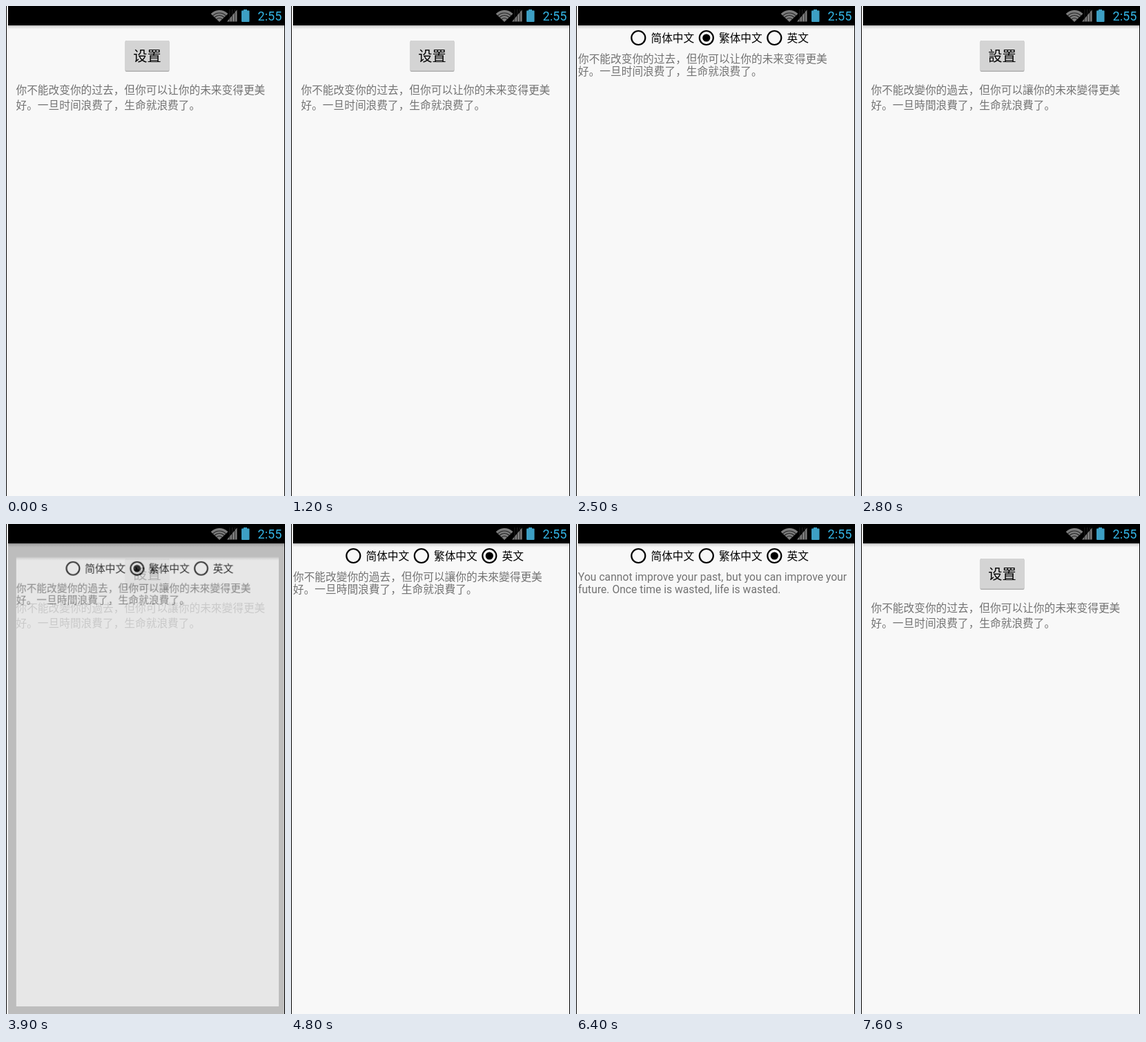
Animation, 404 px wide and 708 px high, one loop 8.6 s. Source, as an HTML page with a canvas:

```html
<!DOCTYPE html>
<html lang="zh">
<head>
<meta charset="utf-8">
<title>Language setting</title>
<style>
html, body { margin: 0; width: 100%; height: 100%; overflow: hidden; background: #000; }
canvas { display: block; width: 404px; height: 708px; }
</style>
</head>
<body>
<canvas id="stage"></canvas>
<script>
const W = 404, H = 708, LOOP = 8600, STEP = 100, ZOOM = 300;
const BAR = 28, LEFT = 3, RIGHT = 403;
const SCREEN_W = 404, SCREEN_H = 718;
const CX = LEFT + SCREEN_W / 2, CY = SCREEN_H / 2;
const CJK = '"Noto Sans CJK SC", "Noto Sans CJK", sans-serif';
const LATIN = 'Roboto, sans-serif';

const langs = [
  { font: CJK, button: '设置', half: 31.5,
    home: ['你不能改变你的过去，但你可以让你的未来变得更美', '好。一旦时间浪费了，生命就浪费了。'] },
  { font: CJK, button: '設置', half: 31.5,
    home: ['你不能改變你的過去，但你可以讓你的未來變得更美', '好。一旦時間浪費了，生命就浪費了。'] },
  { font: LATIN, button: 'setting', half: 39,
    home: ['You cannot improve your past, but you can improve', 'your future. Once time is wasted, life is wasted.'],
    panel: ['You cannot improve your past, but you can improve your', 'future. Once time is wasted, life is wasted.'] }
];
const options = ['简体中文', '繁体中文', '英文'];

// open: settings zoom in; pick: another language is tapped;
// lead: how far the zoom is when it first shows
const visits = [
  { open: 1400, pick: 2500, from: 0, to: 1, lead: 0.2955 },
  { open: 3900, pick: 4800, from: 1, to: 2, lead: 0.219 },
  { open: 6200, pick: 7300, from: 2, to: 0, lead: 0.25 }
];
const presses = [1100, 6000];

const dpr = window.devicePixelRatio || 1;

function setup(canvas, w, h) {
  canvas.width = Math.round(w * dpr);
  canvas.height = Math.round(h * dpr);
  const c = canvas.getContext('2d');
  c.scale(dpr, dpr);
  return c;
}

const layer = document.createElement('canvas');
const stageCtx = setup(document.getElementById('stage'), W, H);
const layerCtx = setup(layer, LEFT + SCREEN_W, SCREEN_H);
let ctx = stageCtx;

function rect(x, y, w, h, fill) {
  ctx.fillStyle = fill;
  ctx.fillRect(x, y, w, h);
}

function round(x, y, w, h, r, fill) {
  ctx.fillStyle = fill;
  ctx.beginPath();
  ctx.roundRect(x, y, w, h, r);
  ctx.fill();
}

function poly(points, fill) {
  ctx.fillStyle = fill;
  ctx.beginPath();
  points.forEach(([x, y]) => ctx.lineTo(x, y));
  ctx.fill();
}

function text(str, x, y, size, font, color, align = 'left') {
  ctx.font = size + 'px ' + font;
  ctx.textAlign = align;
  ctx.fillStyle = color;
  ctx.fillText(str, x, y);
}

function windowBack() {
  rect(LEFT, BAR, SCREEN_W, SCREEN_H - BAR, '#f8f8f8');
  const g = ctx.createLinearGradient(0, BAR, 0, BAR + 6);
  g.addColorStop(0, 'rgba(0,0,0,.24)');
  g.addColorStop(0.5, 'rgba(0,0,0,.07)');
  g.addColorStop(1, 'rgba(0,0,0,0)');
  rect(LEFT, BAR, SCREEN_W, 6, g);
}

function drawButton(lang, pressed) {
  const x = 204.5 - lang.half, w = lang.half * 2;
  if (pressed) {
    round(x - 4.5, 45, w + 9, 54, 4, '#a9daee');
    round(x - 0.5, 49, w + 1, 46, 2, '#4cbbe7');
    rect(x, 94, w, 1, '#3fa5cd');
  } else {
    round(x - 0.5, 50, w + 1, 45, 2, '#b0b0b0');
    round(x, 50, w, 43.5, 1.5, '#d4d4d4');
  }
  text(lang.button, 204.5, 80, 20.2, lang.font, '#000', 'center');
}

function drawHome(id, pressed) {
  const lang = langs[id];
  windowBack();
  drawButton(lang, pressed);
  lang.home.forEach((line, i) => text(line, 14.5, 127 + 22 * i, 15.7, lang.font, '#737373'));
}

function drawPanel(id, choice) {
  const lang = langs[id];
  windowBack();
  options.forEach((label, i) => {
    const x = 90.3 + 98.5 * i;
    ctx.strokeStyle = '#000';
    ctx.lineWidth = 2.2;
    ctx.beginPath();
    ctx.arc(x, 46, 10, 0, 7);
    ctx.stroke();
    if (i === choice) {
      ctx.fillStyle = '#000';
      ctx.beginPath();
      ctx.arc(x, 46, 5.6, 0, 7);
      ctx.fill();
    }
    text(label, x + 18.2, 52, 15.7, CJK, '#000');
  });
  (lang.panel || lang.home).forEach((line, i) =>
    text(line, 3, 81.5 + 18.4 * i, 15.7, lang.font, '#737373'));
}

// Settings window scaled about the screen centre and faded as one layer
function floatPanel(id, choice, amount) {
  ctx = layerCtx;
  drawPanel(id, choice);
  ctx = stageCtx;
  const s = 0.8 + 0.2 * amount;
  ctx.save();
  ctx.globalAlpha = amount;
  ctx.translate(CX, CY);
  ctx.scale(s, s);
  ctx.drawImage(layer, LEFT, 0, 0, 0) ;
  ctx.restore();
}

function drawStatus() {
  rect(LEFT, 0, RIGHT - LEFT, BAR, '#000');
  // wifi: a fan with two dark gaps
  ctx.save();
  ctx.beginPath();
  ctx.moveTo(309, 23);
  ctx.arc(309, 23, 17, -Math.PI * 0.76, -Math.PI * 0.24);
  ctx.closePath();
  ctx.clip();
  rect(297, 5, 24, 19, '#7c7c7c');
  ctx.strokeStyle = '#222';
  ctx.lineWidth = 1.2;
  for (const r of [5.5, 9.5, 13]) {
    ctx.beginPath();
    ctx.arc(309, 23, r, 0, 7);
    ctx.stroke();
  }
  ctx.restore();
  // signal: a triangle cut into bars
  poly([[320, 22.5], [334.5, 22.5], [334.5, 5.5]], '#7c7c7c');
  for (const x of [323.5, 327.2, 331]) rect(x, 5, 0.9, 18, '#222');
  rect(344, 5, 5, 2, '#3d9fc4');
  round(341, 6.5, 11.5, 16.5, 1, '#3d9fc4');
  text('2:55', 399.3, 21.3, 18, LATIN, '#33b5e5', 'right');
}

function drawEdges() {
  rect(0, 0, 1, H, '#000');
  rect(1, 0, 2, H, '#fff');
  rect(RIGHT, 0, 1, H, '#000');
}

const settle = p => 1 - Math.pow(1 - Math.min(p, 1), 5);

function drawApp(t) {
  const last = visits.filter(v => t >= v.open).pop();
  const pressed = presses.some(p => t >= p && t < p + STEP);
  if (!last) return drawHome(0, pressed);

  const since = t - last.pick;
  if (since >= 3 * STEP) return drawHome(last.to, pressed);
  if (since >= 2 * STEP) {
    drawHome(last.to, false);
    return floatPanel(last.to, last.to, 1 - settle(0.22));
  }
  if (since >= 0) return drawPanel(since < STEP ? last.from : last.to, last.to);

  const p = last.lead + (t - last.open) / ZOOM;
  if (p >= 0.85) return drawPanel(last.from, last.from);
  drawHome(last.from, false);
  const dim = Math.min(1, 3 * Math.pow(p, 1.66));
  rect(LEFT, BAR, SCREEN_W, H - BAR, `rgba(0,0,0,${dim})`);
  floatPanel(last.from, last.from, settle(p));
}

function frame(now) {
  const t = Math.floor((now % LOOP) / STEP) * STEP;
  ctx.save();
  ctx.beginPath();
  ctx.rect(LEFT, BAR, RIGHT - LEFT, H - BAR);
  ctx.clip();
  drawApp(t);
  ctx.restore();
  drawStatus();
  drawEdges();
}

// Paints the layer at its own scale, centred on the current origin
const plainDraw = stageCtx.drawImage.bind(stageCtx);
stageCtx.drawImage = image => plainDraw(image, -CX, -CY, LEFT + SCREEN_W, SCREEN_H);

const begin = performance.now();
function loop() {
  frame(performance.now() - begin);
  requestAnimationFrame(loop);
}
loop();
</script>
</body>
</html>
```
